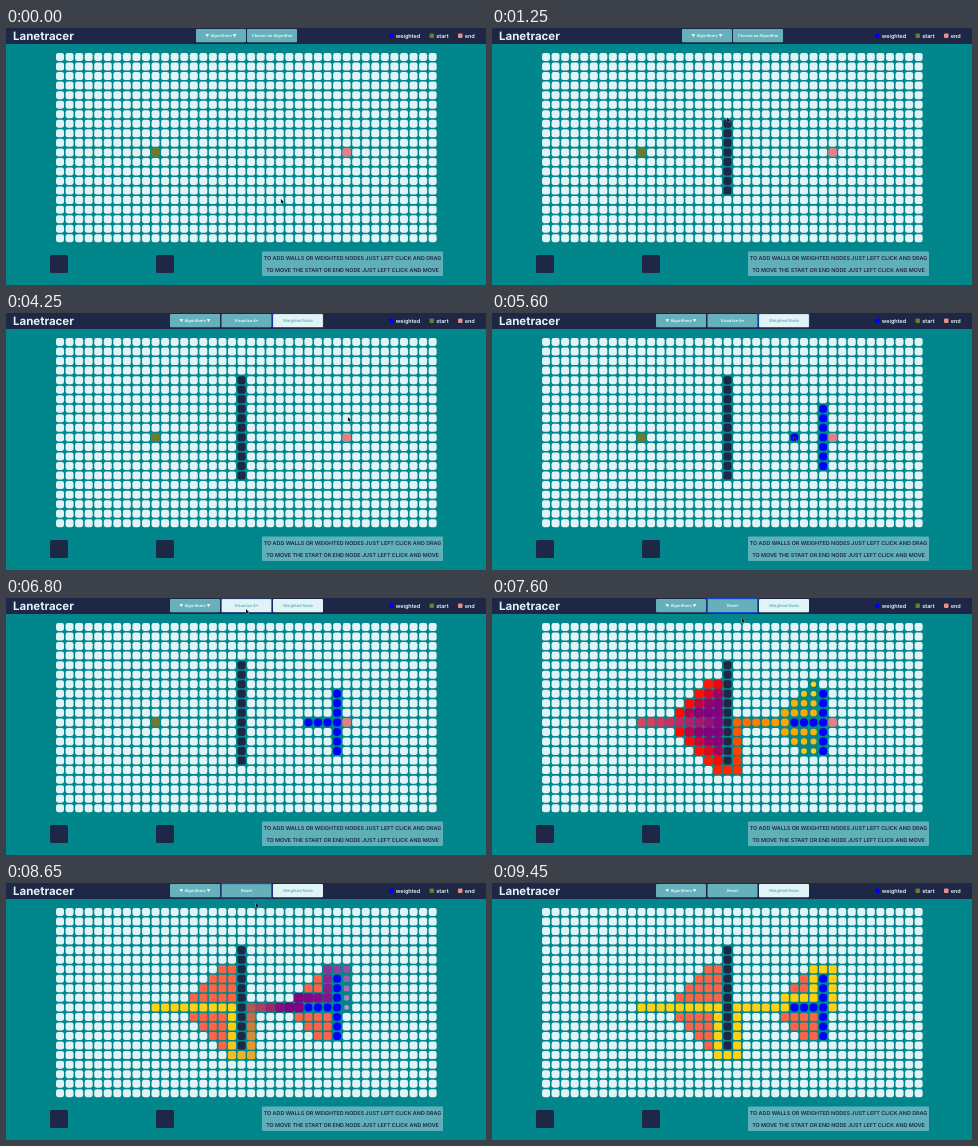
These frames come from a looping animation (480x257 px, 9500 ms). An HTML page with a canvas:

```html
<!DOCTYPE html>
<html lang="en">
<head>
<meta charset="utf-8">
<title>Lanetracer</title>
<style>
  html, body { margin: 0; height: 100%; overflow: hidden; background: #00868b; }
  canvas { display: block; width: 480px; height: 257px; }
</style>
</head>
<body>
<canvas id="stage"></canvas>
<script>
const LOOP = 9500;
const canvas = document.getElementById('stage');
const ctx = canvas.getContext('2d');
const ratio = window.devicePixelRatio || 1;
canvas.width = 480 * ratio;
canvas.height = 257 * ratio;

const NAVY = '#1f2747', PANEL = '#65b0bb', LIGHT = '#e0f3f6', FOCUS = '#1450e6';
const WEIGHT = '#0000ff', START = '#6c7c2c', END = '#dd8288';
const CELL = 8;
const centerX = col => 54 + col * 9.555;
const centerY = row => 29 + row * 9.54;

// Straight run of cells from one point to another, both included
function run(c0, r0, c1, r1) {
  const n = Math.max(Math.abs(c1 - c0), Math.abs(r1 - r0));
  return Array.from({ length: n + 1 }, (_, i) =>
    [c0 + Math.sign(c1 - c0) * i, r0 + Math.sign(r1 - r0) * i]);
}

// Triangle of cells above and below the middle row, sorted by rank
function wedge(left, right, up, down, rank) {
  const cells = [];
  for (let d = 1; d <= Math.max(up, down); d++)
    for (let c = left + d - 1; c <= right; c++) {
      if (d <= up) cells.push([c, 10 - d]);
      if (d <= down) cells.push([c, 10 + d]);
    }
  return cells.sort((a, b) => rank(...a) - rank(...b));
}

const goalDistance = (c, r) => 30 - c + Math.abs(r - 10);
const detour = [...run(18, 15, 20, 15), ...run(20, 14, 20, 10), ...run(21, 10, 25, 10)];
const finish = [[29, 6], ...run(30, 6, 30, 10)];
const visited = [
  ...run(10, 10, 18, 10),
  ...wedge(14, 18, 4, 4, goalDistance),
  ...detour,
  ...wedge(25, 28, 4, 3, (c, r) => c - 25 + Math.abs(r - 10)),
  ...finish
];
const route = [
  ...run(10, 10, 18, 10), ...run(18, 11, 18, 14), ...detour,
  ...run(25, 9, 28, 9), ...run(28, 8, 28, 6), ...finish
];

const timed = (cells, from, step) => cells.map(([c, r], i) => ({ c, r, at: from + i * step }));
const walls = timed(run(19, 14, 19, 4), 450, 105);
const weights = [
  ...timed(run(29, 7, 29, 13), 4450, 130),
  ...timed(run(26, 10, 28, 10), 5600, 150)
];
const visits = timed(visited, 6915, 10);
const steps = timed(route, 7665, 25);

const VISIT = {
  colors: [[255, 215, 30], [255, 165, 0], [255, 10, 0], [128, 0, 128], [255, 99, 71]],
  from: .65, peak: .75, round: .5
};
const ROUTE = {
  colors: [[190, 195, 215], [128, 0, 128], [255, 209, 18]],
  from: .4, peak: .5, round: .27
};

const ease = p => 1 - (1 - p) ** 2.2;
const mix = (a, b, p) => a + (b - a) * p;

function blend(colors, p) {
  const pos = p * (colors.length - 1);
  const i = Math.min(Math.floor(pos), colors.length - 2);
  const k = ease(pos - i);
  return `rgb(${colors[i].map((v, j) => Math.round(mix(v, colors[i + 1][j], k)))})`;
}

function box(x, y, w, h, color, radius = 0) {
  ctx.fillStyle = color;
  ctx.beginPath();
  ctx.roundRect(x, y, w, h, radius);
  ctx.fill();
}

function cell(c, r, color, scale = 1, round = .27) {
  const s = CELL * scale;
  box(centerX(c) - s / 2, centerY(r) - s / 2, s, s, color, s * round);
}

function label(text, x, y, size, color, align = 'center', weight = 600) {
  ctx.font = `${weight} ${size}px Inter, sans-serif`;
  ctx.textRendering = 'geometricPrecision';
  ctx.textAlign = align;
  ctx.textBaseline = 'middle';
  ctx.fillStyle = color;
  ctx.fillText(text, x, y);
}

// Pop-in that swells to 1.2 at the peak, then settles at full size
function pop(item, time, { colors, from, peak, round }) {
  const p = Math.min((time - item.at) / 800, 1);
  const scale = p < peak ? mix(from, 1.2, ease(p / peak)) : mix(1.2, 1, ease((p - peak) / (1 - peak)));
  cell(item.c, item.r, blend(colors, p), scale, mix(round, .2, p));
}

function drawGrid(t) {
  const keys = list => list.filter(i => t >= i.at).map(i => i.r * 40 + i.c);
  const covered = new Set([walls, weights, visits, steps].flatMap(keys));
  const routed = new Set(keys(steps));
  for (let r = 0; r < 20; r++)
    for (let c = 0; c < 40; c++)
      if (!covered.has(r * 40 + c)) {
        const mark = r === 10 && (c === 10 ? START : c === 30 ? END : null);
        cell(c, r, mark || LIGHT, mark ? 1.08 : 1);
      }
  visits.forEach(v => {
    if (t >= v.at && !routed.has(v.r * 40 + v.c)) pop(v, t, VISIT);
  });
  steps.forEach(s => t >= s.at && pop(s, t, ROUTE));
  walls.forEach(w => t >= w.at && cell(w.c, w.r, NAVY));
  weights.forEach(w => t >= w.at && cell(w.c, w.r, WEIGHT, 1, .45));
}

function button(x, text, { light = false, focus = null } = {}) {
  box(x, 1, 50, 13.3, light ? LIGHT : PANEL, 1);
  if (focus) {
    ctx.strokeStyle = FOCUS;
    ctx.lineWidth = 1;
    ctx.setLineDash(focus === 'dotted' ? [1, 1] : []);
    ctx.strokeRect(x - .3, .7, 50.6, 13.9);
    ctx.setLineDash([]);
  }
  label(text, x + 25, 8.2, 4, light ? '#65b0bb' : '#eef8fa');
}

function drawMenu() {
  ctx.save();
  ctx.shadowColor = 'rgba(0, 0, 0, .35)';
  ctx.shadowBlur = 8 * ratio;
  ctx.shadowOffsetY = 3 * ratio;
  box(190, 15, 50, 57, PANEL);
  ctx.restore();
  ['A* Algorithm', "Dijkstra's Algorithm", "Greedy's Best First Search",
    'Depth First Search', 'Breadth First Search']
    .forEach((text, i) => label(text, 215, 19.4 + i * 11, 4, '#eef8fa'));
}

function drawHeader(t) {
  box(0, 0, 480, 16, NAVY);
  label('Lanetracer', 7, 8.6, 11.5, LIGHT, 'left', 700);
  [['weighted', 383, WEIGHT], ['start', 423.5, START], ['end', 452, '#e98f84']].forEach(([text, x, color]) => {
    box(x, 5.5, 4.5, 4.5, color, 1);
    label(text, x + 6.7, 8.1, 5.5, LIGHT, 'left');
  });
  const title = '▼ Algorithms ▼';
  if (t < 2850) {
    const open = t >= 2250;
    if (open) drawMenu();
    button(190, title, { focus: open && 'solid' });
    button(241, 'Choose an Algorithm');
    return;
  }
  const running = t >= 6880, weighting = t >= 3700;
  button(164, title);
  button(215.5, running ? 'Reset' : 'Visualize A*', {
    light: t >= 6650 && !running,
    focus: running ? t < 9000 && 'solid' : t >= 6750 && 'dotted'
  });
  button(267, 'Weighted Node', { light: weighting, focus: weighting && t < 6750 && 'dotted' });
}

function drawFooter() {
  box(44, 227, 18, 18, NAVY, 1.5);
  box(150, 227, 18, 18, NAVY, 1.5);
  box(256, 223.5, 181, 24.5, '#5fb0b8', 1);
  label('TO ADD WALLS OR WEIGHTED NODES JUST LEFT CLICK AND DRAG', 346.5, 230.5, 5.4, NAVY);
  label('TO MOVE THE START OR END NODE JUST LEFT CLICK AND MOVE', 346.5, 242.5, 5.4, NAVY);
}

// Pointer stops: time, x, y
const POINTER = [
  [0, 275, 171], [450, 235, 162], [1500, 235, 67], [2100, 231, 11], [2450, 231, 11],
  [2800, 222, 20], [3150, 250, 24], [3600, 292, 8], [3800, 292, 8], [4250, 342, 104],
  [4450, 331, 96], [5230, 331, 153], [5600, 302, 124], [5900, 322, 124], [6100, 322, 124],
  [6700, 240, 11], [6900, 240, 11], [7200, 250, 20], [8800, 250, 20], [9100, 258, -8]
];

function drawPointer(t) {
  const next = POINTER.findIndex(p => p[0] > t);
  if (next < 0) return;
  const [t0, x0, y0] = POINTER[next - 1], [t1, x1, y1] = POINTER[next];
  const p = (t - t0) / (t1 - t0);
  ctx.save();
  ctx.translate(mix(x0, x1, p), mix(y0, y1, p));
  ctx.beginPath();
  [[0, 0], [0, 4.4], [1, 3.6], [1.8, 5], [2.5, 4.6], [1.8, 3.2], [3, 3.1]].forEach(q => ctx.lineTo(...q));
  ctx.closePath();
  ctx.lineWidth = .5;
  ctx.strokeStyle = '#cfe4e8';
  ctx.stroke();
  ctx.fillStyle = '#111';
  ctx.fill();
  ctx.restore();
}

function frame() {
  const t = performance.now() % LOOP;
  ctx.setTransform(ratio, 0, 0, ratio, 0, 0);
  box(0, 0, 480, 257, '#00868b');
  drawGrid(t);
  drawFooter();
  drawHeader(t);
  drawPointer(t);
  requestAnimationFrame(frame);
}
frame();
</script>
</body>
</html>
```
